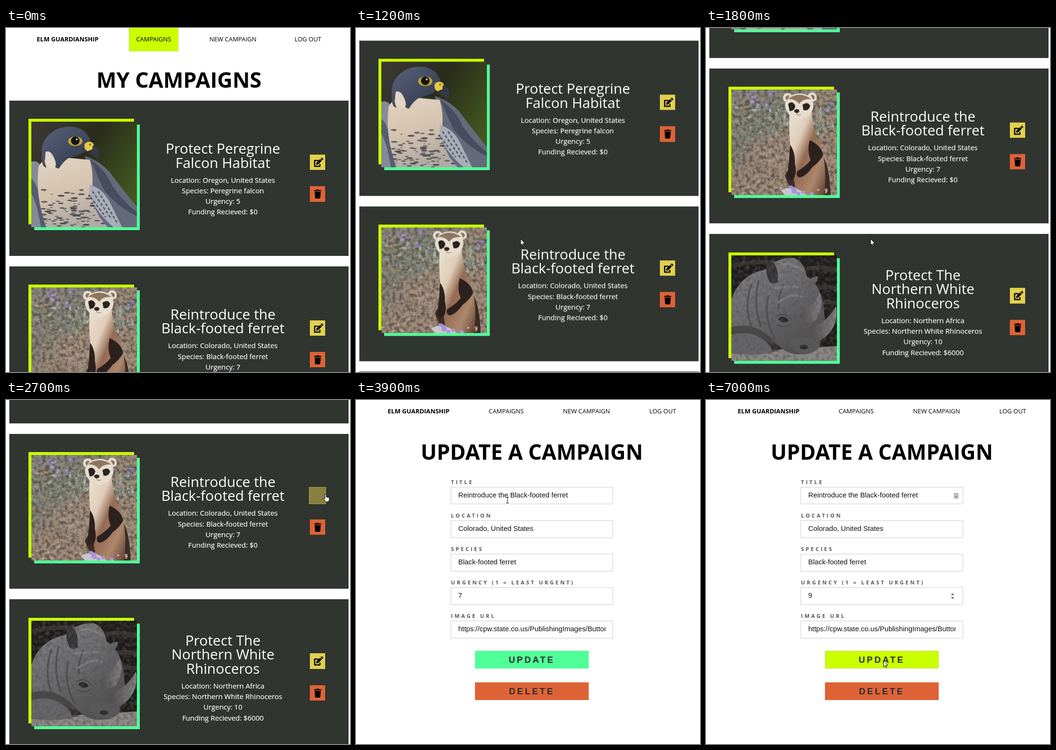
An HTML page that plays this animation: 720 px wide and 720 px high, repeating every 7.1 s.

```html
<!DOCTYPE html>
<html lang="en">
<head>
<meta charset="utf-8">
<title>My campaigns</title>
<style>
:root { --lime: #cbff00; --mint: #50ff98; --dark: #303530; --yellow: #e2d050; --orange: #dd6337; }
* { box-sizing: border-box; }
html, body { margin: 0; width: 100%; height: 100%; overflow: hidden; background: #fff; }
body { position: relative; font: 14.8px/22.2px "Open Sans", sans-serif; color: #000; }
.stage { position: absolute; left: 0; top: 0; width: 720px; height: 720px; overflow: hidden; }
.page, .page > *, .card > *, .photo *, .ptr, .ptr svg { position: absolute; }
.page { left: 0; top: 0; width: 720px; height: 720px; }
svg { display: block; overflow: visible; }
h1, h2, p { margin: 0; }

/* everything below shares one clock */
.list, .form, .hot, .update, .digit b, .spin, .badge, .ptr, .arrow, .hand, .beam { animation: 7100ms linear infinite; }

nav span { position: absolute; top: 0; width: 160px; margin-left: -80px; text-align: center; font-size: 12.95px; line-height: 47.4px; white-space: nowrap; }
nav span:first-of-type { font-weight: 700; }
nav i { position: absolute; left: 257px; top: -2px; width: 104px; height: 51px; background: var(--lime); border: 1px dotted #e3b7b0; }
h1 { left: 0; top: 78px; width: 724px; text-align: center; font-size: 44.4px; line-height: 60px; white-space: nowrap; }

.list { animation-name: scroll; }
@keyframes scroll {
  0%, 13.38% { transform: translateY(0); }
  19.718% { transform: translateY(-225px); }
  25.352% { transform: translateY(-414px); animation-timing-function: ease-out; }
  26.76%, 100% { transform: translateY(-428px); }
}
.card { left: 7px; width: 710px; height: 324.8px; background: var(--dark); color: #fff; }
.photo { left: 46px; top: 44.3px; width: 221px; height: 221px; }
.photo::before, .photo::after { content: ""; position: absolute; width: 221px; height: 221px; }
.photo::before { left: -6px; top: -6px; background: var(--lime); }
.photo::after { left: 6px; top: 6px; background: var(--mint); }
.photo svg { left: 0; top: 0; z-index: 1; overflow: hidden; }
.info { left: 297px; top: 2.3px; width: 300px; height: 324px; display: flex; flex-direction: column; justify-content: center; text-align: center; white-space: nowrap; }
.info p { -webkit-text-stroke: .2px; }
h2 { font-size: 29.6px; line-height: 29.6px; font-weight: 400; margin-bottom: 10.5px; }
.btn { left: 629px; width: 32.4px; height: 32.4px; color: #000; }
.btn svg { width: 100%; height: 100%; fill: currentColor; }
.edit { top: 113px; background: var(--yellow); }
.trash { top: 179.3px; background: var(--orange); }
.hot { left: 627px; top: 111px; width: 36.4px; height: 36.4px; border: 2px dotted #a89d2c; animation-name: invert; }
@keyframes invert {
  0%, 36.61% { opacity: 0; background: #e2d050; color: #000; }
  36.62% { opacity: 1; background: #e2d050; color: #000; }
  38.03% { opacity: 1; background: #88803f; color: #88803f; }
  39.44%, 100% { opacity: 1; background: #303530; color: #e2d050; }
}

.form { background: #fff; animation-name: open; animation-timing-function: step-end; }
@keyframes open { 0% { opacity: 0; } 42.25%, 100% { opacity: 1; } }
.form h1 { width: 736px; }
.field { left: 198.3px; width: 339.4px; height: 70px; }
.field label { position: absolute; left: .5px; top: 0; font-size: 11.1px; line-height: 20px; font-weight: 700; letter-spacing: 3.7px; color: #555; white-space: nowrap; }
.field div { position: absolute; top: 20.2px; width: 100%; height: 36.6px; border: 1.85px solid #ccc; padding: 0 14.8px; }
.field p { height: 33px; overflow: hidden; font: 14.8px/33px "Liberation Sans", Arial, sans-serif; color: #111; white-space: nowrap; }
.digit b { display: block; font-weight: 400; animation-name: count; animation-timing-function: step-end; }
@keyframes count {
  0% { transform: none; }
  74.64% { transform: translateY(-33px); }
  78.86%, 100% { transform: translateY(-66px); }
}
.spin { left: 511px; top: 403px; animation-name: spin; animation-timing-function: step-end; }
@keyframes spin { 0% { opacity: 0; } 61.97%, 100% { opacity: 1; } }
.badge { left: 519px; top: 195px; animation-name: badge; animation-timing-function: step-end; }
@keyframes badge { 0% { opacity: 0; } 76.05%, 100% { opacity: 1; } }
.act { left: 248.6px; width: 238.6px; height: 37px; text-align: center; font: 700 18.5px/35px "Liberation Sans", Arial, sans-serif; letter-spacing: 3.7px; color: #2b2b2b; border: 1px solid transparent; }
.update { top: 524.5px; background: var(--mint); animation-name: lime; }
.delete { top: 591px; background: var(--orange); }
@keyframes lime {
  0%, 87.3% { background: #50ff98; border: 1px solid transparent; }
  87.31% { border: 1px dotted #b9b48a; }
  90.1%, 100% { background: #cbff00; border: 1px dotted #b9b48a; }
}

.ptr { left: 0; top: 0; animation-name: move; animation-timing-function: ease-in-out; }
@keyframes move {
  0%, 4.2% { transform: translate(470px, 730px); }
  9.86%, 12.68% { transform: translate(417px, 490px); }
  16.9%, 28.17% { transform: translate(344px, 441px); }
  36.6%, 42.25% { transform: translate(669px, 197px); }
  47.18%, 56.34% { transform: translate(317px, 209px); }
  62.68%, 64.08% { transform: translate(490px, 408px); }
  69.01% { transform: translate(512px, 406px); }
  76.05%, 82.4% { transform: translate(515px, 405px); }
  88.73%, 100% { transform: translate(371px, 545px); }
}
.ptr svg { left: 0; top: 0; fill: #fff; stroke: #000; animation-timing-function: step-end; }
.arrow { animation-name: arrow; }
.hand { animation-name: hand; }
.beam { animation-name: beam; }
@keyframes arrow {
  0% { opacity: 1; } 36% { opacity: 0; } 42.25% { opacity: 1; } 46.48% { opacity: 0; }
  57.4% { opacity: 1; } 61.6% { opacity: 0; } 68.3%, 100% { opacity: 1; }
}
@keyframes hand { 0% { opacity: 0; } 36% { opacity: 1; } 42.25%, 100% { opacity: 0; } }
@keyframes beam {
  0% { opacity: 0; } 46.48% { opacity: 1; } 57.4% { opacity: 0; } 61.6% { opacity: 1; } 68.3%, 100% { opacity: 0; }
}
</style>
</head>
<body>
<svg width="0" height="0" style="position:absolute">
  <symbol id="pen" viewBox="0 0 32.4 32.4">
    <path d="M21 19.5v5H10V12.3h8" fill="none" stroke="currentColor" stroke-width="2.5" stroke-linejoin="round"/>
    <path d="M13.6 17.3l8-8 3.5 3.5-8 8-4 .6zM22.6 8.3l1.3-1.2q1-.8 2 0l1.7 1.7q.8 1 0 2l-1.3 1.2z"/>
  </symbol>
  <symbol id="bin" viewBox="0 0 32.4 32.4">
    <path d="M9 8.3h4.4l.9-1.3h4.2l.9 1.3h4.4v2.2H9zM10 11.7h12.8l-.9 12.6q-.2 1.7-1.8 1.7h-7.4q-1.6 0-1.8-1.7z"/>
  </symbol>
  <filter id="grain" x="0" y="0" width="1" height="1">
    <feTurbulence type="fractalNoise" baseFrequency=".13" numOctaves="3" seed="4"/>
    <feColorMatrix values="0 0 0 0 .1  0 0 0 0 .08  0 0 0 0 .07  2.4 0 0 0 -.95"/>
  </filter>
</svg>

<div class="stage">
  <div class="page list">
    <nav><i></i><span style="left:129px">ELM GUARDIANSHIP</span><span style="left:309px">CAMPAIGNS</span><span style="left:475px">NEW CAMPAIGN</span><span style="left:632px">LOG OUT</span></nav>
    <h1>MY CAMPAIGNS</h1>

    <div class="card" style="top:152px">
      <div class="photo"><svg width="221" height="221">
        <defs>
          <linearGradient id="moss" x2="1" y2=".6"><stop stop-color="#3d3a36"/><stop offset=".5" stop-color="#2a2b1c"/><stop offset="1" stop-color="#43571f"/></linearGradient>
          <linearGradient id="breast" x2=".3" y2="1"><stop stop-color="#e6d8c6"/><stop offset=".6" stop-color="#d5c2ae"/><stop offset="1" stop-color="#b3aaa5"/></linearGradient>
          <linearGradient id="slate" y2="1"><stop stop-color="#59637c"/><stop offset="1" stop-color="#2f3546"/></linearGradient>
          <clipPath id="chest"><path d="M15 95Q25 70 70 75L122 80Q132 110 126 150Q130 190 160 221H32Q8 160 15 95"/></clipPath>
        </defs>
        <path fill="url(#moss)" d="M0 0h221v221H0z"/>
        <path fill="#858a97" d="M0 84Q12 80 20 92L40 221H0z"/>
        <path fill="#565d70" d="M0 120Q14 130 18 165L30 221H20Q12 170 0 150z"/>
        <path fill="#636a7c" d="M112 72Q150 84 172 116Q205 160 221 178V221H140z"/>
        <path fill="#474d5e" d="M124 80Q155 100 170 135Q190 165 221 190V198Q175 175 150 140z"/>
        <g clip-path="url(#chest)"><path fill="url(#breast)" d="M0 60h170v161H0z"/><g id="bars"></g></g>
        <path fill="#a9adb7" d="M122 132Q150 140 165 170L190 221H172Q130 185 122 150z"/>
        <path d="M128 146l40 58M140 146l40 66M124 158l32 42" stroke="#555b6b" stroke-width="3" stroke-dasharray="6 4"/>
        <path fill="url(#slate)" d="M22 66Q20 40 42 23Q62 8 88 11Q114 14 124 39L112 64Q95 72 84 74Q70 78 58 98Q48 98 46 84Q42 66 34 62Q24 82 32 96Q20 96 22 66"/>
        <path fill="#e2d5c5" d="M30 63Q42 58 50 82Q54 94 46 97Q32 96 28 84z"/>
        <path fill="#e7c94c" d="M112 46Q122 38 130 46L132 56L118 62Q109 58 112 46"/>
        <path fill="#343947" d="M128 50Q141 52 143 66Q143 75 137 80Q134 70 118 67L128 60z"/>
        <ellipse cx="92" cy="41" rx="15" ry="10" fill="#b9a53c"/><circle cx="92" cy="40" r="9" fill="#17130f"/><circle cx="95" cy="37" r="2" fill="#c9cbd2"/>
        <circle cx="123" cy="48" r="2" fill="#8a4420"/>
      </svg></div>
      <div class="info"><h2>Protect Peregrine<br>Falcon Habitat</h2><p>Location: Oregon, United States<br>Species: Peregrine falcon<br>Urgency: 5<br>Funding Recieved: $0</p></div>
      <div class="btn edit"><svg><use href="#pen"/></svg></div>
      <div class="btn trash"><svg><use href="#bin"/></svg></div>
    </div>

    <div class="card" style="top:498.7px">
      <div class="photo"><svg width="221" height="221">
        <defs>
          <linearGradient id="field" y2="1"><stop stop-color="#8d8880"/><stop offset=".3" stop-color="#85877c"/><stop offset=".48" stop-color="#a08c79"/><stop offset="1" stop-color="#a8917d"/></linearGradient>
          <linearGradient id="fur" y2="1"><stop stop-color="#ede2d3"/><stop offset=".3" stop-color="#dfcdb8"/><stop offset=".48" stop-color="#946a53"/><stop offset=".75" stop-color="#ad876b"/><stop offset="1" stop-color="#5b3f30"/></linearGradient>
        </defs>
        <path fill="url(#field)" d="M0 0h221v221H0z"/>
        <g id="plants"></g><g id="soil"></g>
        <path fill="#b09a85" d="M52 124Q80 96 122 114L128 160Q100 190 70 150z" opacity=".5"/>
        <path filter="url(#grain)" d="M0 0h221v221H0z"/>
        <path fill="#3b2d25" d="M112 180Q125 150 180 130Q205 140 208 221H140Q120 205 112 180"/>
        <path fill="url(#fur)" d="M122 48Q120 90 124 122Q126 170 137 221H194Q202 160 186 115Q172 90 168 46z"/>
        <path fill="#2c211e" d="M123 116Q134 130 133 155Q138 175 130 187Q120 192 117 182Q121 155 123 116M164 106Q190 118 192 138Q184 152 170 162Q158 180 144 184Q134 182 138 171Q154 162 166 148Q158 128 164 106"/>
        <g fill="#e6dccd"><circle cx="118" cy="17" r="10"/><circle cx="169" cy="16" r="10"/><path d="M112 34Q115 10 143 8Q172 10 172 34Q168 60 140 62Q116 56 112 34"/></g>
        <path fill="#8d7560" d="M118 20Q142 2 168 20Q150 18 142 30Q132 18 118 20M113 17a6 6 0 0 1 9-4l-6 10zM175 16a6 6 0 0 0-9-4l6 10z"/>
        <path fill="#2a2220" d="M119 30Q128 22 134 34Q132 46 122 45zM149 32Q160 24 165 34Q162 46 151 43z"/>
        <ellipse cx="137" cy="45" rx="5.5" ry="4" fill="#332722"/><path d="M137 48v4q5 3 9 0" fill="none" stroke="#7b6253"/>
        <path fill="#c9c5cf" d="M104 211Q130 196 158 221H112z"/><g id="blooms"></g>
      </svg></div>
      <div class="info"><h2>Reintroduce the<br>Black-footed ferret</h2><p>Location: Colorado, United States<br>Species: Black-footed ferret<br>Urgency: 7<br>Funding Recieved: $0</p></div>
      <div class="btn edit"><svg><use href="#pen"/></svg></div>
      <div class="btn hot"><svg><use href="#pen"/></svg></div>
      <div class="btn trash"><svg><use href="#bin"/></svg></div>
    </div>

    <div class="card" style="top:845.4px">
      <div class="photo"><svg width="221" height="221">
        <defs>
          <linearGradient id="hide" x2=".7" y2="1"><stop stop-color="#808184"/><stop offset=".5" stop-color="#6c6d70"/><stop offset="1" stop-color="#4d4e50"/></linearGradient>
          <linearGradient id="horn" x2="1"><stop stop-color="#4c4c4e"/><stop offset="1" stop-color="#858384"/></linearGradient>
        </defs>
        <path fill="#1d1c1b" d="M0 0h221v221H0z"/>
        <path d="M0 22Q60 8 110 20M150 30Q190 20 221 32M170 70Q200 60 221 72M190 96l31 4" fill="none" stroke="#34312e" stroke-width="9"/>
        <path fill="#8b8986" d="M0 204Q110 196 221 190V221H0z"/>
        <path fill="url(#hide)" d="M0 92Q18 40 70 30Q95 4 130 5Q152 12 158 44Q185 60 192 100L198 150Q192 190 156 206Q120 212 98 188Q70 178 50 186L0 180z"/>
        <path fill="#39393b" d="M0 150Q40 140 72 164Q92 178 104 196Q90 206 70 200L0 176z" opacity=".7"/>
        <path fill="#66676b" d="M0 166Q40 156 66 176Q88 192 84 204Q40 212 0 205z"/>
        <path d="M42 60Q26 110 42 150M58 52Q44 100 62 150M78 84Q66 130 92 176M110 60Q96 90 100 112" fill="none" stroke="#47484a" stroke-width="4" opacity=".7"/>
        <path d="M100 20Q130 14 152 34M96 100Q130 76 148 88M90 70Q116 64 140 66" fill="none" stroke="#909193" stroke-width="5" opacity=".55"/>
        <path fill="#333436" d="M74 40Q70 14 84 9Q104 24 103 50Q92 64 80 56z"/>
        <path fill="#77787a" d="M84 9Q106 22 104 52L97 54Q100 26 84 9"/>
        <path fill="#656668" d="M152 58Q176 40 182 45Q178 66 156 70z"/>
        <path fill="url(#horn)" d="M142 126Q168 112 185 79Q194 104 178 134Q160 150 142 126"/>
        <path fill="url(#horn)" d="M163 152Q200 142 219 106Q226 146 196 172Q172 188 163 152"/>
        <path fill="#58595b" d="M120 176Q150 166 184 178Q192 196 162 206Q130 212 120 176"/>
        <ellipse cx="152" cy="192" rx="9" ry="5" fill="#2b2b2c"/>
        <path d="M98 133Q108 122 120 136Q110 146 98 133" fill="#262627"/><path d="M94 128Q110 116 126 134M96 144Q110 154 122 144" fill="none" stroke="#434446" stroke-width="2"/>
        <path filter="url(#grain)" opacity=".6" d="M0 0h221v221H0z"/>
      </svg></div>
      <div class="info"><h2>Protect The<br>Northern White<br>Rhinoceros</h2><p>Location: Northern Africa<br>Species: Northern White Rhinoceros<br>Urgency: 10<br>Funding Recieved: $6000</p></div>
      <div class="btn edit"><svg><use href="#pen"/></svg></div>
      <div class="btn trash"><svg><use href="#bin"/></svg></div>
    </div>
  </div>

  <div class="page form">
    <nav><span style="left:131px">ELM GUARDIANSHIP</span><span style="left:314.4px">CAMPAIGNS</span><span style="left:482.5px">NEW CAMPAIGN</span><span style="left:642px">LOG OUT</span></nav>
    <h1>UPDATE A CAMPAIGN</h1>
    <div class="field" style="top:161.7px"><label>TITLE</label><div><p>Reintroduce the Black-footed ferret</p></div></div>
    <div class="field" style="top:231.8px"><label>LOCATION</label><div><p>Colorado, United States</p></div></div>
    <div class="field" style="top:301.9px"><label>SPECIES</label><div><p>Black-footed ferret</p></div></div>
    <div class="field" style="top:372px"><label>URGENCY (1 = LEAST URGENT)</label><div><p class="digit"><b>7<br>8<br>9</b></p></div></div>
    <div class="field" style="top:442.1px"><label>IMAGE URL</label><div><p>https://cpw.state.co.us/PublishingImages/Buttons</p></div></div>
    <svg class="spin" width="10" height="15"><path fill="#efefef" d="M0 0h10v15H0z"/><path fill="#444" d="M2.2 5L5 2l2.8 3zM2.2 10L5 13l2.8-3z"/></svg>
    <svg class="badge" width="9" height="11"><path fill="#eee" stroke="#888" stroke-width="1.3" d="M.7.7h7.6v9.6H.7z"/><circle cx="4.5" cy="4" r="1.3" fill="#777"/><path fill="#777" d="M2.5 6h4v2.5h-4z"/></svg>
    <div class="act update">UPDATE</div>
    <div class="act delete">DELETE</div>
  </div>

  <div class="ptr">
    <svg class="arrow" width="12" height="18"><path d="M.5.5v13l3-2.8 2 4.5 2-.9-2-4.3h4z"/></svg>
    <svg class="hand" width="12" height="18"><path d="M-1.4 10V1.2Q0-.8 1.3 1.2V6l5 1.2q1.500.5 1.400 2.300Q7.500 13 6 16H0Q-1 14-4.500 9.800Q-4.300 7.500-1.400 10z"/></svg>
    <svg class="beam" width="8" height="14"><path fill="none" d="M-3-5.500h2.500l.5.500.5-.5H3M0-5V6M-3 6.500h2.500L0 6l.5.500H3"/></svg>
  </div>
</div>

<script>
let seed = 11;
const rnd = () => (seed = seed * 16807 % 2147483647) / 2147483647;

// Strews n flecks over a box, in turn of colour.
function strew(id, n, x, y, w, h, rx, ry, colors) {
  let out = "";
  for (let i = 0; i < n; i++) {
    const k = .5 + rnd();
    out += `<ellipse cx="${x + rnd() * w}" cy="${y + rnd() * h}" rx="${rx * k}" ry="${ry * k}" fill="${colors[i % colors.length]}"/>`;
  }
  document.getElementById(id).innerHTML += out;
}
strew("bars", 110, 25, 142, 130, 79, 5, 1.3, ["#4a4a50", "#5d5a5c"]);
strew("plants", 130, 0, 24, 221, 72, 5, 2, ["#6c7a5c", "#a3aea5", "#7d8771", "#58634b", "#9a9b90"]);
strew("plants", 90, 72, 34, 149, 62, 2, 5, ["#b0bab3", "#7e8c7f", "#93a096"]);
strew("plants", 12, 32, 2, 60, 40, 4, 3, ["#a99ac9", "#8f80bd"]);
strew("plants", 8, 195, 25, 26, 24, 4, 3, ["#a99ac9", "#8f80bd"]);
strew("plants", 14, 0, 35, 60, 60, 2, 2, ["#c38a55", "#b4a05e"]);
strew("soil", 150, 0, 100, 120, 121, 3, 2, ["#b8a491", "#7f6b5b", "#a18b78", "#8c7766"]);
strew("blooms", 14, 120, 203, 85, 17, 4, 3, ["#a894d8", "#c9c2e0", "#a894d8", "#b9754c"]);
</script>
</body>
</html>
```
